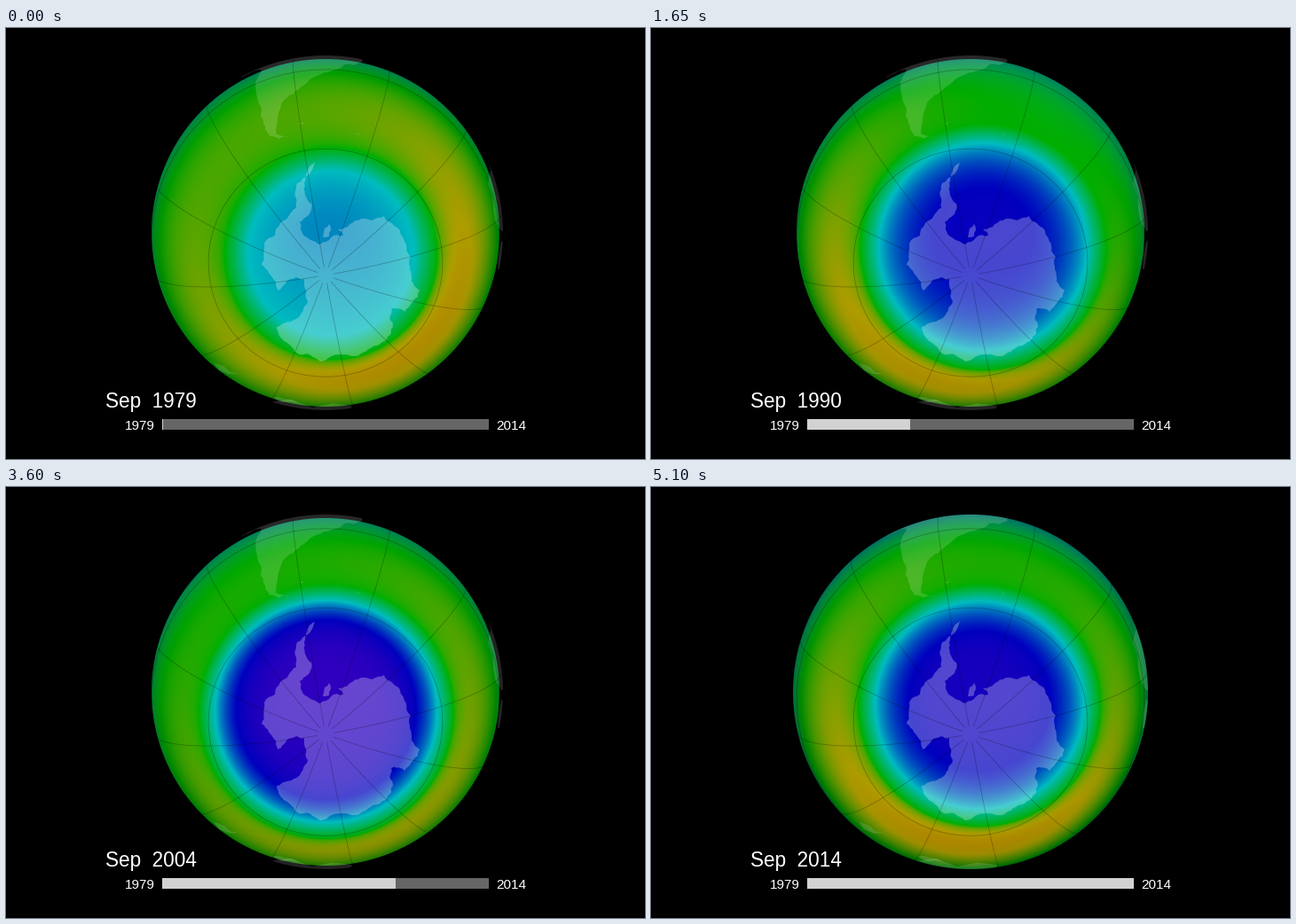
A matplotlib script that plays this animation: 720x486 px, repeating every 5850 ms.

```python
import numpy as np
import matplotlib.pyplot as plt
from matplotlib.animation import FuncAnimation
from matplotlib.patches import Circle, PathPatch, Rectangle
from matplotlib.path import Path

W, H, DPI = 720, 486, 72
CX, CY, RADIUS = 360, 231, 200
VIEW, TILT, LON0 = 3.0, np.radians(9.8), -50
BAR_X, BAR_Y, BAR_W, BAR_H = 176, 441, 368, 12
YEARS = [y for y in range(1979, 2015) if y != 1995]
STEP, HOLD = 150, 5

# year: core level, hole x, y, radius, belt level, belt swing, belt heading
KEYS = {
    1979: (1.75, 366, 254, 93, 3.85, .42, 50),
    1984: (1.20, 360, 252, 107, 3.75, .55, 88),
    1990: (.95, 374, 247, 117, 3.60, .60, 115),
    1993: (.82, 355, 263, 119, 3.45, .40, 10),
    2000: (.15, 358, 244, 122, 3.75, .45, 45),
    2008: (.65, 366, 257, 126, 3.35, .40, 75),
    2014: (.75, 370, 246, 117, 3.75, .55, 95),
}
# Colours for levels 0 to 5: violet, blue, cyan, green, yellow, orange
PALETTE = np.array([(75, 0, 190), (0, 0, 190), (0, 188, 192),
                    (0, 175, 0), (176, 158, 0), (196, 90, 0)]) / 255

# Key points of the coasts; roughen() adds the detail
ANTARCTICA = [
    (348, 151), (339, 163), (336, 175), (344, 198), (341, 211), (331, 219),
    (333, 229), (354, 244), (380, 234), (374, 227), (400, 215), (426, 212),
    (444, 229), (456, 258), (455, 272), (466, 296), (449, 320), (434, 317),
    (436, 337), (427, 353), (402, 366), (354, 376), (330, 368), (313, 353),
    (305, 337), (330, 326), (340, 308), (336, 283), (318, 284), (306, 296),
    (304, 286), (288, 267), (291, 243), (309, 220), (327, 203), (328, 175)]
BERKNER = [(357, 236), (359, 226), (364, 221), (366, 228), (364, 235)]
SOUTH_AMERICA = [
    (265, 56), (288, 47), (283, 78), (290, 107), (297, 122), (318, 123),
    (304, 119), (306, 103), (310, 88), (324, 74), (336, 64), (362, 50),
    (402, 38), (400, 5), (280, 5)]
AFRICA = [(542, 146), (543, 175), (549, 205), (558, 229), (575, 229), (575, 150)]
FAR_ISLES = [
    [(558, 240), (554, 272), (572, 272), (572, 240)],
    [(226, 374), (246, 382), (262, 390), (240, 386)],
    [(301, 416), (314, 418), (330, 423), (312, 422)],
    [(296, 422), (345, 428), (390, 426), (385, 445), (300, 445)],
    [(329, 107), (338, 105), (333, 109)],
    [(394, 117), (399, 120), (397, 121)]]


def roughen(points, seed, rounds, amount=.15):
    """Break every edge at a shifted midpoint."""
    rng = np.random.default_rng(seed)
    pts = np.array(points, float)
    for _ in range(rounds):
        d = np.roll(pts, -1, axis=0) - pts
        side = np.column_stack([-d[:, 1], d[:, 0]])
        mid = pts + d / 2 + side * rng.uniform(-amount, amount, (len(pts), 1))
        pts = np.stack([pts, mid], axis=1).reshape(-1, 2)
    return pts


def project(lat, lon):
    """Perspective view of the globe; hidden points become NaN."""
    c, a = np.radians(90 + lat), np.radians(lon - LON0)
    x, y, z = np.sin(c) * np.sin(a), np.sin(c) * np.cos(a), np.cos(c)
    up = y * np.cos(TILT) - z * np.sin(TILT)
    depth = y * np.sin(TILT) + z * np.cos(TILT)
    s = RADIUS * np.sqrt(VIEW ** 2 - 1) / (VIEW - depth)
    s = np.where(depth > 1 / VIEW, s, np.nan)
    return CX + s * x, CY - s * up


# Pixel grid over the globe
X0, Y0, N = 159, 30, 402
gx, gy = np.meshgrid(X0 + np.arange(N) + .5, Y0 + np.arange(N) + .5)
radial = np.hypot(gx - CX, gy - CY)
rho = np.clip(radial / RADIUS, 0, 1)
shade = 1 - .4 * rho ** 14
fall = (.55 + .35 * (CY - gy) / RADIUS) * rho ** 10


def settings(year):
    """Values for a year: eased between keys, with some seeded variation."""
    vals = np.array([np.interp(year, list(KEYS), col)
                     for col in zip(*KEYS.values())])
    if year not in KEYS:
        spread = np.array([.08, 3, 3, 3, .06, .04, 15])
        vals += spread * np.random.default_rng(year).uniform(-1, 1, 7)
    return vals


def ozone(year):
    core, hx, hy, edge, belt, swing, heading = settings(year)
    gap, power = .14 + .05 * core ** 2, 5.5 - 1.8 * core
    dx, dy = gx - hx, gy - hy
    dist, theta = np.hypot(dx, dy), np.arctan2(dy, dx)

    q = dist / edge
    inner = core + (2 - core) * np.minimum(q, 1) ** power
    inner = inner + .25 * dy / 100 * np.clip(1 - q, 0, 1)

    # t runs from the rim of the hole (0) to the limb of the globe (1)
    ox, oy = CX - hx, CY - hy
    along = ox * np.cos(theta) + oy * np.sin(theta)
    limb = along + np.sqrt(RADIUS ** 2 - ox ** 2 - oy ** 2 + along ** 2)
    rim = edge * (1 + gap)
    t = np.clip((dist - rim) / (limb - rim), 0, 1)
    bump = np.clip(np.sin(np.pi * t ** .8), 0, 1) ** .7
    peak = belt - 3 + swing * np.cos(theta - np.radians(heading))
    outer = 2 + np.clip((q - 1) / gap, 0, 1) + peak * bump - fall
    return np.where(q < 1, inner, outer)


def globe(year):
    level = np.clip(ozone(year), 0, 5)
    rgba = np.empty((N, N, 4))
    for i in range(3):
        rgba[..., i] = np.interp(level, range(6), PALETTE[:, i]) * shade
    size = 200 if year >= 2005 else 196
    rgba[..., 3] = np.clip(size - radial + .5, 0, 1)
    return rgba


fig = plt.figure(figsize=(W / DPI, H / DPI), dpi=DPI, facecolor="black")
ax = fig.add_axes([0, 0, 1, 1])
ax.axis("off")
picture = ax.imshow(globe(1979), extent=(X0, X0 + N, Y0 + N, Y0),
                    interpolation="nearest", aspect="auto", zorder=1)
ax.set_xlim(0, W)
ax.set_ylim(H, 0)
disc = Circle((CX, CY), RADIUS, transform=ax.transData)


def land(points, alpha, seed, rounds=1):
    patch = PathPatch(Path(roughen(points, seed, rounds)), fc="white",
                      ec="none", alpha=alpha, zorder=2)
    ax.add_patch(patch)
    patch.set_clip_path(disc)


def grid_line(lat, lon):
    x, y = project(lat, lon)
    line, = ax.plot(x, y, color="black", alpha=.27, lw=.8, zorder=3)
    line.set_clip_path(disc)


def label(x, y, text, size):
    return ax.text(x, y, text, color="white", fontsize=size, zorder=5,
                   family="Liberation Sans", va="baseline")


land(ANTARCTICA, .28, 4, 3)
land(BERKNER, .28, 1)
land(SOUTH_AMERICA, .16, 8, 3)
land(AFRICA, .14, 3)
for n, isle in enumerate(FAR_ISLES):
    land(isle, .14, n)

for lon in range(0, 360, 30):
    grid_line(np.linspace(-88, 10, 120), lon)
for lat in (-60, -30):
    grid_line(lat, np.linspace(0, 360, 361))

title = label(112, 428, "", 22.5)
label(134, 453, "1979", 15.2)
label(552, 453, "2014", 15.2)
ax.add_patch(Rectangle((BAR_X, BAR_Y), BAR_W, BAR_H, fc="#666666", lw=0))
bar = ax.add_patch(Rectangle((BAR_X, BAR_Y), 1, BAR_H, fc="#d2d2d2", lw=0))


def draw(i):
    year = YEARS[min(i, len(YEARS) - 1)]
    picture.set_data(globe(year))
    title.set_text(f"Sep  {year}")
    bar.set_width(max(1, round(BAR_W * (year - 1979) / 35)))
    return picture, title, bar


anim = FuncAnimation(fig, draw, frames=len(YEARS) + HOLD - 1, interval=STEP,
                     repeat=True, blit=False)
plt.show()
```
